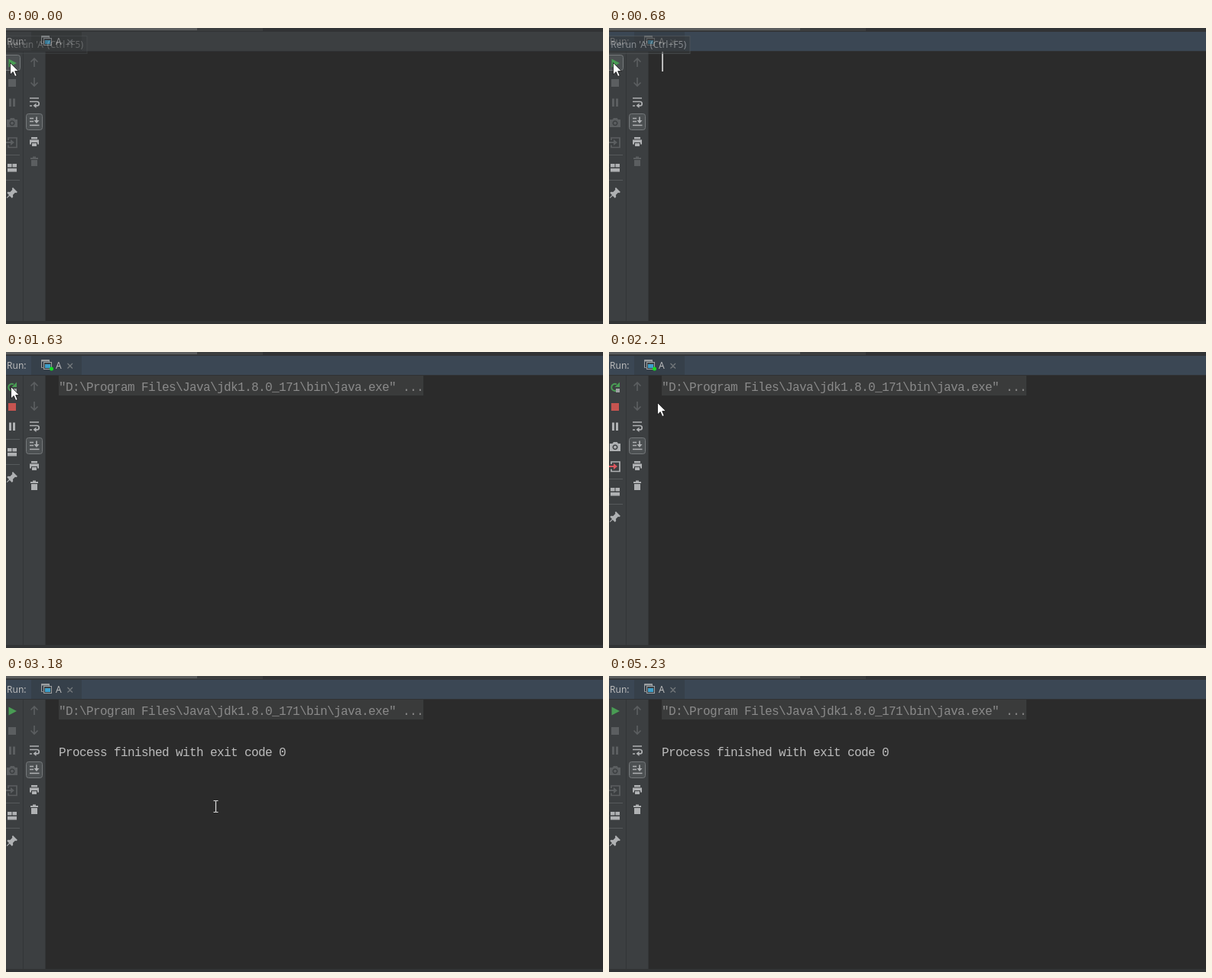
Write an HTML page that moves like this. It is 781 px wide and 388 px high and loops after 6190 ms.

```html
<!DOCTYPE html>
<html lang="en">
<head>
<meta charset="utf-8">
<title>Run console</title>
<style>
  html, body { margin: 0; width: 100%; height: 100%; overflow: hidden; background: #2b2b2b; }
  svg { display: block; width: 100vw; height: 100vh; }
  text { white-space: pre; }
  .ui { font: 12px "Noto Sans", "Open Sans", sans-serif; fill: #bbb; }
  .log { font: 16px "Liberation Mono", monospace; letter-spacing: -.6px; }
  .icon { --c: #afb1b3; fill: var(--c); }
  .icon.off { --c: #5b5e60; }
  .line { fill: none; stroke: var(--c); stroke-width: 1.7; }
</style>
</head>
<body>
<svg viewBox="0 0 781 388">
  <rect width="781" height="388" fill="#2b2b2b"/>
  <rect width="781" height="5" fill="#313335"/>
  <rect width="336" height="4" fill="#3c3e3f"/>
  <rect width="250" height="3" fill="#5b5d5e"/>
  <rect id="header" y="5" width="781" height="25" fill="#3b4754"/>
  <rect id="tab" x="33" y="5" width="66" height="25" fill="#36404a"/>
  <rect y="30" width="781" height="1" fill="#303234"/>
  <rect y="31" width="52" height="357" fill="#3c3f41"/>
  <path d="M22.5 31V388M51.5 31V388" stroke="#323537"/>
  <rect y="384" width="781" height="4" fill="#323435"/>

  <text class="ui" x="1" y="22">Run:</text>
  <g fill="none" stroke="#9da0a2">
    <path d="M48.500 20.500H46.500V10.500H56.500V13"/>
    <rect x="49.500" y="13.500" width="10" height="9" fill="#3c4043"/>
    <path d="M46 11.500H57" stroke-width="2"/>
  </g>
  <rect x="51" y="16" width="7" height="5" fill="#3d9fca"/>
  <circle id="dot" cx="59.500" cy="22" r="2.500" fill="#15dc24"/>
  <text class="ui" x="65" y="22">A</text>
  <path d="M80.500 15l6.500 6.500m0-6.500l-6.500 6.500" stroke="#777b7e" stroke-width="1.200"/>

  <rect id="hover" x="-3" y="35.500" width="21.500" height="20" rx="3" fill="#4c5052" stroke="#75797b"/>
  <path id="play" d="M3.500 40.500L14 46 3.500 51.500Z" fill="#499c54"/>
  <g id="rerun">
    <path d="M9.500 50.500A4.500 4.500 0 1 1 10 42.500" fill="none" stroke="#499c54" stroke-width="2"/>
    <path d="M14 39.500V46H7.500Z" fill="#499c54"/>
    <rect x="9" y="48" width="5" height="5" fill="#9da0a2"/>
  </g>
  <rect id="stop" x="3" y="67" width="10" height="10"/>
  <g id="pause" class="icon"><path d="M4 92.500h3v10.500h-3zM9 92.500h3v10.500h-3z"/></g>
  <g id="tools">
    <g id="camera" class="icon">
      <path fill-rule="evenodd" d="M1 120h3.500l1.500-2h4.500l1.500 2H15v10H1zM8 121.300a3.500 3.500 0 1 0 .01 0z"/>
      <circle cx="8" cy="124.800" r="2"/>
    </g>
    <g id="exit" class="icon">
      <path class="line" d="M3 147V144H14V156.500H3V153.500"/>
      <path id="arrow" d="M0 149h6v-3l5 4-5 4v-3H0z"/>
    </g>
  </g>
  <g id="lower">
    <path d="M0 166.500H18M0 199.500H18" stroke="#565a5c"/>
    <g class="icon">
      <path d="M2 178h5.500v4.500H2zM8.500 178H14v4.500H8.500zM2 184h12v4.500H2z"/>
      <path d="M9 209l6 6-1.700 1.200-1.300-.4-3 3 .2 2.700-1.400 1.400-3-3L1.500 223l-.7-.7 3.200-3.400-2.800-2.800 1.600-1.400 2.500.2 3-3-.4-1.600z"/>
    </g>
  </g>

  <g class="icon off">
    <path class="line" d="M37 51V40.500M32.500 44.500L37 40l4.500 4.500M37 65V75.500M32.500 71.500L37 76l4.500-4.500"/>
  </g>
  <rect x="26.500" y="112.500" width="21" height="21" rx="3" fill="#4c5052" stroke="#75797b"/>
  <g class="icon">
    <path class="line" d="M31 92H43M31 96.500H40.500a2.700 2.700 0 0 1 0 5.400H37M31 102H34"/>
    <path d="M39.500 98.500v6.500L35.500 101.800z"/>
    <path class="line" d="M31 118.500H36M31 122.500H36M31 127.500H43.500M40 116.500V123"/>
    <path d="M36.500 121h7L40 125z"/>
    <path d="M33 143h8v2.500h-8zM31 146.500h12v6h-2v-2.500h-8v2.500h-2zM34 151h6v4h-6z"/>
  </g>
  <g id="trash" class="icon"><path d="M32 170h3v-1.500h4V170h3v2H32zM33 173h8v8h-8z"/></g>

  <g id="command">
    <rect x="69" y="31" width="477" height="26" fill="#3a3b3b"/>
    <text class="log" x="69" y="51" fill="#8a8a8a">"D:\Program Files\Java\jdk1.8.0_171\bin\java.exe" ...</text>
  </g>
  <text id="done" class="log" x="69" y="105" fill="#bbb">Process finished with exit code 0</text>
  <rect id="caret" x="69" y="31" width="2" height="26" fill="#bbb"/>

  <g id="tip">
    <rect x="-4" y="10.500" width="110" height="23" fill="#36393b" stroke="#555a5d"/>
    <text class="ui" x="101" y="26" text-anchor="end">Rerun 'A' (Ctrl+F5)</text>
  </g>

  <path id="pointer" d="M.5 .5V16l3.700-3.500 2.500 6 2.500-1-2.500-5.900h4.700z" fill="#fff" stroke="#111" stroke-width=".8"/>
  <path id="beam" d="M-3-7.500H-.8L0-7 .8-7.500H3M0-7V7M-3 7.500H-.8L0 7 .8 7.500H3" fill="none" stroke="#ddd" stroke-width="1.200"/>
</svg>
<script>
const LOOP = 6190;
const $ = id => document.getElementById(id);
const show = (id, on) => $(id).setAttribute("visibility", on ? "visible" : "hidden");
const set = (id, name, value) => $(id).setAttribute(name, value);
const within = (t, a, b) => t >= a && t < b;
const last = (keys, t) => keys.findLast(k => t >= k[0]);

// time, x, y: the mouse is sampled, so every position holds
const pointerPath = [[0, 5, 45], [1230, 6, 45], [1910, 15, 49], [2060, 35, 55], [2210, 63, 66]];
const beamPath = [
  [2330, 83.5, 75], [2480, 157.5, 113], [2600, 236.5, 151], [2750, 274.5, 171],
  [4150, 275.5, 171], [4270, 464.5, 243], [4420, 575.5, 288], [4570, 636.5, 315],
  [4690, 696.5, 341], [4810, 736.5, 358], [4960, 750.5, 368], [5080, 757.5, 373]
];
const tipFade = [[0, .35], [120, 1], [680, .6], [830, 0]];

function place(id, path, t, from, to) {
  const on = within(t, from, to);
  show(id, on);
  if (!on) return;
  const [, x, y] = last(path, t);
  set(id, "transform", `translate(${x} ${y})`);
}

function draw(t) {
  const focused = t >= 680;
  const running = within(t, 1630, 3030);
  const attached = within(t, 2210, 3030);
  const compact = within(t, 1630, 2210);
  const enable = (id, on) => $(id).classList.toggle("off", !on);

  set("header", "fill", focused ? "#3b4754" : "#3c3f41");
  set("tab", "fill", focused ? "#36404a" : "#353839");
  set("tip", "opacity", last(tipFade, t)[1]);
  show("hover", t < 830 || within(t, 1910, 2060));
  show("caret", within(t, 680, 1110));
  show("dot", running);
  show("play", !running);
  show("rerun", running);
  set("stop", "fill", running ? "#c75450" : "#5b5e60");
  enable("pause", within(t, 1630, 3180));
  enable("camera", attached);
  enable("exit", attached);
  set("arrow", "fill", attached ? "#db5860" : "#5b5e60");
  show("tools", !compact);
  set("lower", "transform", `translate(0 ${compact ? -52 : 0})`);
  enable("trash", t >= 1630);
  show("command", t >= 1630);
  show("done", t >= 3180);
  place("pointer", pointerPath, t, 0, 2330);
  place("beam", beamPath, t, 2330, 5230);
}

const start = performance.now();
function tick() {
  draw((performance.now() - start) % LOOP);
  requestAnimationFrame(tick);
}
tick();
</script>
</body>
</html>
```
